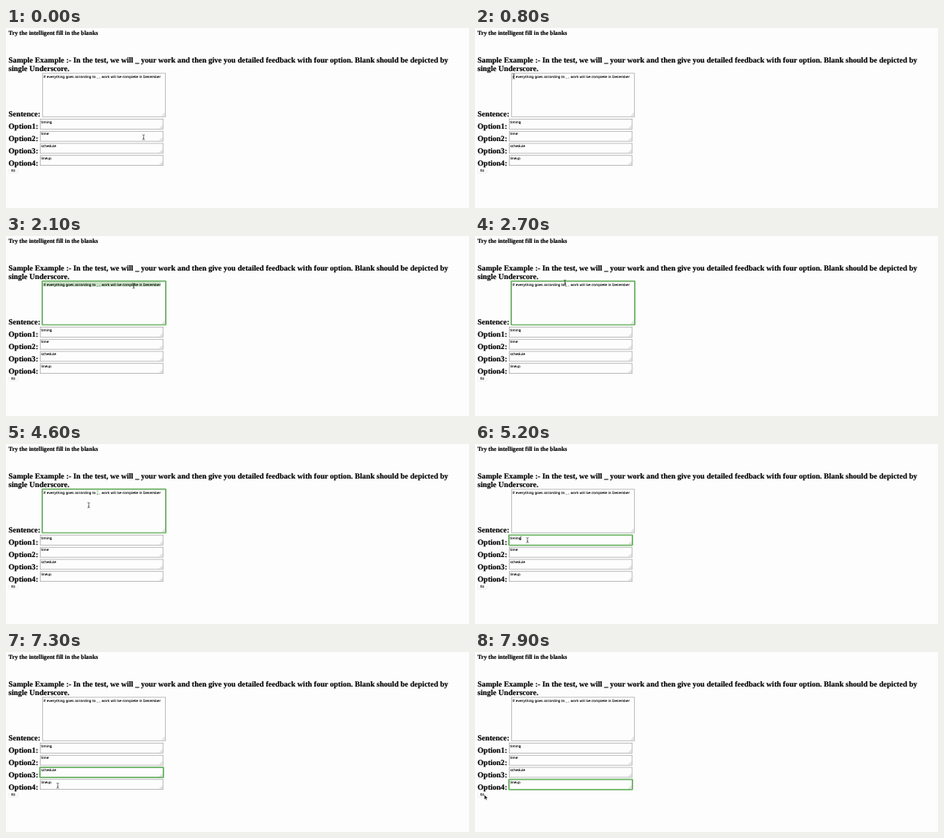
Recreate the animation shown at these times as an HTML page. Size 600x234 px, loop 8 s.

```html
<!DOCTYPE html>
<html lang="en">
<head>
<meta charset="utf-8">
<title>Fill in the blanks</title>
<style>
  html, body { margin: 0; width: 100%; height: 100%; overflow: hidden; background: #fdfdfd; }
  svg { display: block; width: 100%; height: 100%; }
  /* the tiny turn keeps baselines from snapping to whole pixels */
  text { text-rendering: geometricPrecision; white-space: pre; transform: rotate(.01deg); stroke: #000; stroke-width: .16; }
  .head { font: bold 10.04px "Liberation Serif", serif; }
  .title { font: bold 7.83px "Liberation Serif", serif; }
  .field { font: 4.33px "DejaVu Sans", sans-serif; stroke-width: .1; }
  .box { fill: none; stroke: #a0a0a0; stroke-width: .7; }
  .grip { fill: none; stroke: #8c8c8c; stroke-width: .45; }
  .ring { fill: none; stroke: #6db566; stroke-width: 1.7; }
</style>
</head>
<body>
<svg id="stage" viewBox="0 0 600 234"></svg>
<script>
const LOOP = 8000, STEP = 100;
const stage = document.getElementById('stage');

function set(el, attrs) {
  for (const k in attrs) el.setAttribute(k, attrs[k]);
}
function add(tag, attrs, text) {
  const el = document.createElementNS('http://www.w3.org/2000/svg', tag);
  set(el, attrs);
  if (text) el.textContent = text;
  return stage.appendChild(el);
}
function show(el, on) {
  el.setAttribute('visibility', on ? 'visible' : 'hidden');
}
const label = (cls, x, y, text) => add('text', { class: cls, x, y }, text);

label('title', 3.3, 9.4, 'Try the intelligent fill in the blanks');
label('head', 3.3, 44.7, 'Sample Example :- In the test, we will _ your work and then give you detailed feedback with four option. Blank should be depicted by');
label('head', 3.3, 56.1, 'single Underscore.');

const selection = add('rect', { y: 60.3, height: 5.4, fill: '#c6dfc1' });

// Text areas: the sentence, then four options
const values = ['If everything goes according to _ , work will be complete in December',
  'timing', 'time', 'schedule', 'lineup'];
const fields = values.map((value, i) => {
  const x = i ? 44.3 : 47.3, w = 159.4;
  const y = i ? 118.5 + (i - 1) * 15.75 : 58.9;
  const h = i ? 12.9 : 56.4;
  label('head', 3.3, y + h - .1, i ? `Option${i}:` : 'Sentence:');
  add('rect', { class: 'box', x, y, width: w, height: h });
  const r = x + w - .9, b = y + h - .9;
  add('path', { class: 'grip', d: `M${r - 3.6} ${b}L${r} ${b - 3.6}M${r - 1.7} ${b}L${r} ${b - 1.7}` });
  const text = label('field', x + 1.3, y + (i ? 5.1 : 5.6), value);
  const ring = add('rect', { class: 'ring', x: x - .4, y: y - .2, width: w + .8, height: h + .4, rx: .6 });
  return { y, text, ring };
});

// Button
add('rect', { x: 3.3, y: 181.9, width: 12.2, height: 6.9, rx: 1.6, fill: '#e0e0e0' });
add('rect', { x: 3.5, y: 181.8, width: 11.8, height: 6.5, rx: 1.5, fill: '#fefefe' });
label('field', 6.7, 186.5, 'fill');

const caret = add('rect', { width: .55, height: 5.2, fill: '#111' });
const beam = add('path', {
  d: 'M-1.6-3.3Q0-3.3 0-2.4V2.4Q0 3.3-1.6 3.3M1.6-3.3Q0-3.3 0-2.4M0 2.4Q0 3.3 1.6 3.3M-.8 1.2H.8',
  fill: 'none', stroke: '#2a2a2a', 'stroke-width': .65
});
const arrow = add('path', {
  d: 'M0 0V5.9L1.4 4.6L2.3 6.8L3.3 6.4L2.4 4.3H4.3Z',
  fill: '#111', stroke: '#fff', 'stroke-width': .3
});

// Each move eases to (x, y); sway swings sideways, dip bows downwards
const moves = [
  { from: 100, to: 300, x: 63, y: 68.3 },
  { from: 400, to: 900, x: 48.3, y: 62 },
  { from: 1000, to: 1500, x: 148, y: 67.5 },
  { from: 1900, to: 2500, x: 116.5, y: 60.5, sway: 50 },
  { from: 2800, to: 3300, x: 118, y: 64.3 },
  { from: 3700, to: 3900, x: 119.8, y: 65 },
  { from: 4500, to: 5000, x: 68, y: 125 },
  { from: 5300, to: 5900, x: 69.5, y: 140, dip: 18 },
  { from: 6200, to: 6500, x: 67.5, y: 157 },
  { from: 6800, to: 7400, x: 67, y: 171, dip: 13 },
  { from: 7600, to: 7900, x: 12.2, y: 185.8 }
];
function pointer(t) {
  let x = 178.3, y = 142;
  for (const m of moves) {
    if (t <= m.from) break;
    const left = Math.max(0, (m.to - t) / (m.to - m.from));
    const k = 1 - left ** 1.25;
    x += (m.x - x) * k + (m.sway || 0) * Math.sin(2 * Math.PI * k);
    y += (m.y - y) * k + (m.dip || 0) * Math.sin(Math.PI * k);
  }
  return { x, y };
}

const clicks = [1100, 5200, 5900, 6600, 7400];
const sentence = fields[0].text;
const blank = values[0].indexOf('_');
const startOf = i => sentence.getStartPositionOfChar(i).x;
const endOf = (text, i) => text.getEndPositionOfChar(i).x;

// The drag trails the pointer, then takes the whole line
function selected(t) {
  if (t >= 1100 && t < 2700) {
    const end = t < 1500 ? pointer(t - STEP).x : endOf(sentence, values[0].length - 1);
    return [startOf(0), end];
  }
  if (t >= 3800 && t < clicks[1]) return [startOf(blank), endOf(sentence, blank)];
  return [0, 0];
}

function draw(t) {
  const { x, y } = pointer(t);
  const onButton = t >= 7800;
  for (const el of [beam, arrow]) set(el, { transform: `translate(${x} ${y})` });
  show(beam, !onButton);
  show(arrow, onButton);

  const [a, b] = selected(t);
  set(selection, { x: a, width: Math.max(0, b - a) });

  const focus = clicks.filter(c => t >= c).length - 1;
  fields.forEach((f, i) => show(f.ring, i === focus));

  const placed = focus ? clicks[focus] : 2700;
  const blink = focus >= 0 && t >= placed && t < placed + 500;
  show(caret, blink);
  if (blink) {
    const { text, y: top } = fields[focus];
    set(caret, {
      x: focus ? endOf(text, values[focus].length - 1) : startOf(blank) - .3,
      y: top + 1.3
    });
  }
}

const start = performance.now();
function tick() {
  const t = (performance.now() - start) % LOOP;
  draw(Math.floor(t / STEP) * STEP);
  requestAnimationFrame(tick);
}
tick();
</script>
</body>
</html>
```
